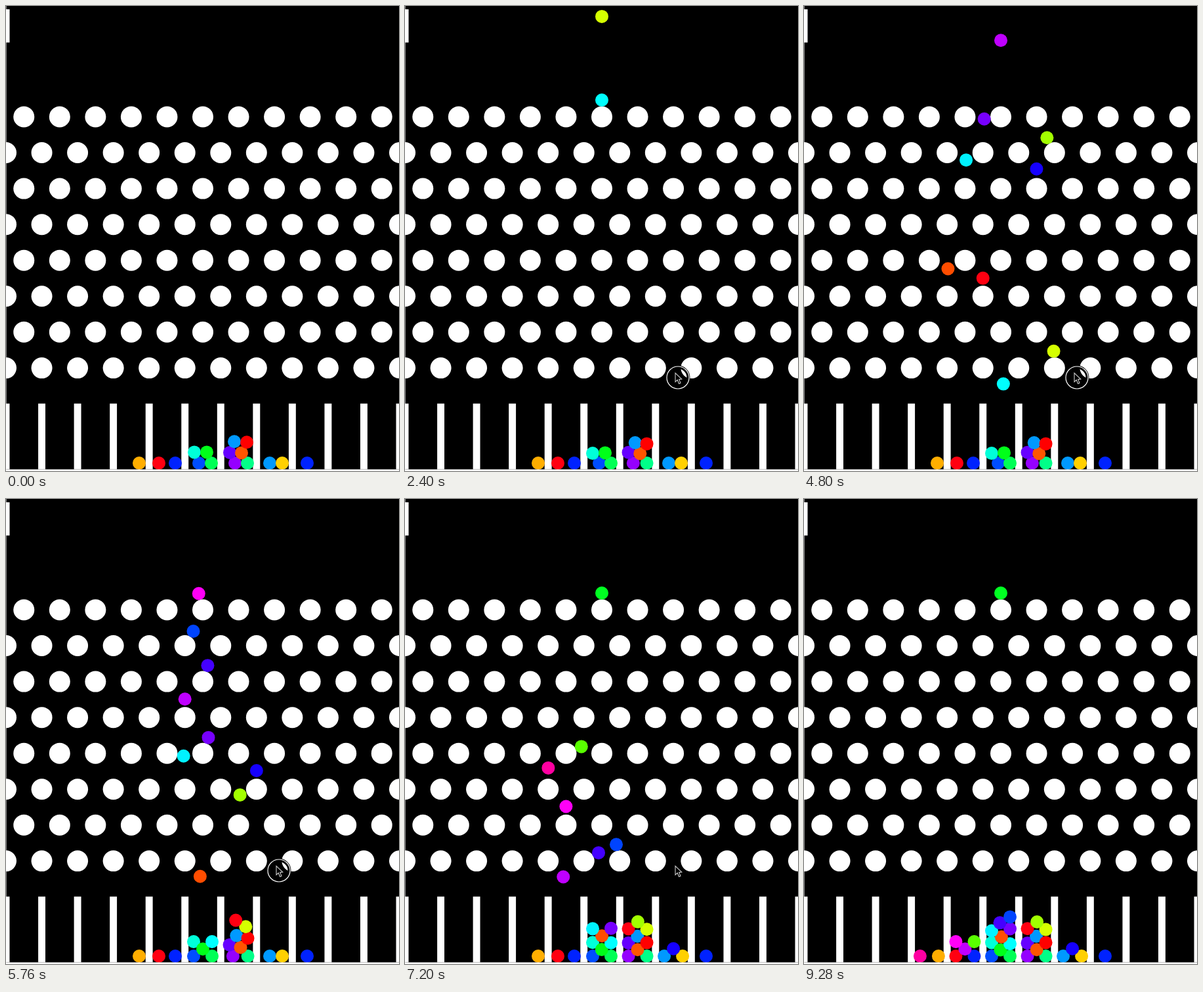
Recreate the animation shown at these times as an HTML page with a canvas. Size 599x707 px, loop 9.44 s.

```html
<!DOCTYPE html>
<html lang="en">
<head>
<meta charset="utf-8">
<title>Ball drop board</title>
<style>
  html, body { margin: 0; width: 100%; height: 100%; overflow: hidden; background: #000; }
  canvas { display: block; }
</style>
</head>
<body>
<canvas id="stage" width="599" height="707"></canvas>
<script>
const ctx = document.getElementById('stage').getContext('2d');
const LOOP = 9440, STEP = 160, TICK = 20;
const PITCH = 600 / 11, PEG_R = 16, BALL_R = 10, ROWS = 8;
const FIRST_ROW = 168.5, FIRST_HIT = 143, FLOOR = 695, FALL_TIME = 240;
const CONTACT = 18, BIN_SLACK = 14, GRAVITY = 0.8;
const RELEASE = 7.7; // row count after which a ball drops freely into its bin

const clamp = (v, lo, hi) => Math.min(hi, Math.max(lo, v));
const mix = (a, b, u) => a + (b - a) * u;
const hueColor = hue => `hsl(${hue} 100% 50%)`;

// Balls already in the bins, bottom first: each rests on those before it.
const pile = [];
function stack(hue, x) {
  let y = FLOOR;
  for (const b of pile) {
    const dx = Math.abs(x - b.x);
    if (dx < CONTACT) y = Math.min(y, b.y - Math.sqrt(CONTACT ** 2 - dx ** 2));
  }
  pile.push({ color: hueColor(hue), x, y, lastX: x, lastY: y, start: 0, loose: true });
}
stack(41, 203);
stack(356, 233);
stack(232, 258);
stack(222, 294);
stack(140, 313);
stack(171, 287);
stack(126, 306);
stack(275, 349);
stack(152, 368);
stack(264, 341);
stack(20, 359);
stack(204, 348);
stack(0, 367);
stack(204, 402);
stack(49, 421);
stack(232, 459);

// Released balls: the route names the side taken at each row (lower case
// skips a peg), wait is the time spent on the first peg, pace the ms per row.
const SIDE = { L: -1, R: 1, l: -3, r: 3 };
const drops = [];
function drop(hue, route, wait, pace) {
  const i = drops.length;
  const start = 3547 + (i - 4) * (i < 4 ? 409 : 277);
  const columns = [0];
  for (const side of route) columns.push(columns[columns.length - 1] + SIDE[side]);
  drops.push({ color: hueColor(hue), start, columns, leave: start + FALL_TIME + wait, pace, loose: false });
}
drop(180, 'RRLRLLRL', 272, 300);
drop(70, 'RRLRRLRL', 300, 276);
drop(18, 'lRLRLRRR', 347, 309);
drop(356, 'RLRLLRRR', 63, 273);
drop(82, 'rLRLRLRL', 749, 213);
drop(245, 'RRRRLRLR', 116, 318);
drop(183, 'LLRLRLRR', -130, 331);
drop(268, 'LRLRRLRL', 0, 273);
drop(285, 'LLRLLRLR', 0, 291);
drop(256, 'RLRLRLLR', 0, 272);
drop(224, 'LRRLRLRL', 0, 246);
drop(302, 'LLLRLRLR', 0, 247);
drop(99, 'LLLRRLRL', -140, 298);
drop(322, 'LLLRLLRL', -64, 200);
drop(128, '', LOOP, 1); // stays balanced on the first peg

function avoidPegs(x, y) {
  const row = clamp(Math.round((y - FIRST_ROW) / PITCH), 0, ROWS - 1);
  const shift = row % 2 ? 0 : PITCH / 2;
  const pegX = Math.round((x - shift) / PITCH) * PITCH + shift;
  const pegY = FIRST_ROW + row * PITCH;
  const dx = x - pegX, dy = y - pegY, dist = Math.hypot(dx, dy) || 1;
  const push = Math.max(1, (PEG_R + BALL_R - 0.5) / dist);
  return [pegX + dx * push, pegY + dy * push];
}

// Accelerated fall, then one slide and drop per row of pegs.
function followRoute(ball, t) {
  const fall = (t - ball.start) / FALL_TIME;
  if (fall < 1) return [300, FIRST_HIT * fall ** 2];
  const rows = Math.max(0, (t - ball.leave) / ball.pace);
  const row = Math.floor(rows), u = rows - row;
  const from = ball.columns[row], to = ball.columns[row + 1] ?? from;
  const x = 300 + PITCH / 2 * mix(from, to, Math.sin(u * Math.PI / 2));
  return avoidPegs(x, FIRST_HIT + PITCH * (row + u ** 1.6));
}

function moveFreely(ball) {
  const vx = (ball.x - ball.lastX) * 0.83, vy = (ball.y - ball.lastY) * 0.97;
  [ball.lastX, ball.lastY] = [ball.x, ball.y];
  ball.x += vx;
  ball.y += vy + GRAVITY;
}

function separate(a, b) {
  const dx = b.x - a.x, dy = b.y - a.y, dist = Math.hypot(dx, dy) || 1;
  if (dist >= CONTACT) return;
  const push = (CONTACT - dist) / dist / 2;
  a.x -= dx * push;
  a.y -= dy * push;
  b.x += dx * push;
  b.y += dy * push;
}

function keepInBin(ball) {
  ball.y = Math.min(ball.y, FLOOR);
  if (ball.y < 594) return;
  ball.bin ??= (Math.floor(ball.x / PITCH) + 0.5) * PITCH;
  ball.x = clamp(ball.x, ball.bin - BIN_SLACK, ball.bin + BIN_SLACK);
}

function advance(balls, t) {
  for (const ball of balls) {
    if (t < ball.start) continue;
    if (ball.loose) {
      moveFreely(ball);
    } else {
      [ball.lastX, ball.lastY] = [ball.x, ball.y];
      [ball.x, ball.y] = followRoute(ball, t);
      ball.loose = t - ball.leave > RELEASE * ball.pace;
    }
  }
  const loose = balls.filter(b => b.loose);
  for (let pass = 0; pass < 8; pass++) {
    loose.forEach((a, i) => loose.slice(i + 1).forEach(b => separate(a, b)));
    loose.forEach(keepInBin);
  }
}

// The whole loop is worked out once, so a picture depends on time alone.
function simulate() {
  const balls = [...pile, ...drops], frames = [];
  for (let t = 0; t < LOOP; t += TICK) {
    if (t) advance(balls, t);
    if (t % STEP === 0)
      frames.push(balls.filter(b => t >= b.start).map(({ x, y, color }) => ({ x, y, color })));
  }
  return frames;
}

function disc(x, y, r, color) {
  ctx.fillStyle = color;
  ctx.beginPath();
  ctx.arc(x, y, r, 0, 2 * Math.PI);
  ctx.fill();
}

function ring(x, y, r, width, color) {
  ctx.strokeStyle = color;
  ctx.lineWidth = width;
  ctx.beginPath();
  ctx.arc(x, y, r, 0, 2 * Math.PI);
  ctx.stroke();
}

function drawBoard() {
  ctx.fillStyle = '#000';
  ctx.fillRect(0, 0, 599, 707);
  for (let row = 0; row < ROWS; row++)
    for (let i = 0; i < 12; i++)
      disc((i + (row % 2 ? 0 : 0.5)) * PITCH, FIRST_ROW + row * PITCH, PEG_R, '#fff');
  ctx.fillRect(0, 0, 0.5, 707);
  ctx.fillRect(0, 5, 5.5, 50.5);
  for (let i = 0; i < 12; i++) ctx.fillRect(i * PITCH - PITCH / 10, 604.5, PITCH / 5, 100);
}

function drawCursor(t) {
  if (t < 160 || t >= 7840) return;
  const arrive = clamp((t - 320) / 480, 0, 1), leave = clamp((t - 7200) / 640, 0, 1);
  const x = mix(553, 411, arrive) + 120 * leave;
  const y = mix(653, 557, arrive) + 150 * leave;
  if (t >= 1280 && t < 6480) {
    ring(x + 5, y + 8, 16, 5, '#000');
    ring(x + 5, y + 8, 17, 1.2, '#fff');
  }
  ctx.save();
  ctx.translate(x, y);
  ctx.beginPath();
  for (const p of [[1, 1], [1, 14.5], [4.2, 11.5], [6.6, 17.3], [9, 16.3], [6.7, 10.7], [10.7, 10.4]]) ctx.lineTo(...p);
  ctx.closePath();
  ctx.fillStyle = '#000';
  ctx.fill();
  ctx.strokeStyle = '#ccc';
  ctx.lineWidth = 1.1;
  ctx.stroke();
  ctx.restore();
}

const frames = simulate();
const begin = performance.now();
function tick() {
  const index = Math.floor((performance.now() - begin) % LOOP / STEP);
  drawBoard();
  for (const { x, y, color } of frames[index]) disc(x, y, BALL_R, color);
  ctx.fillStyle = '#fff';
  ctx.fillRect(0, 704.5, 599, 3);
  drawCursor(index * STEP);
  requestAnimationFrame(tick);
}
tick();
</script>
</body>
</html>
```
